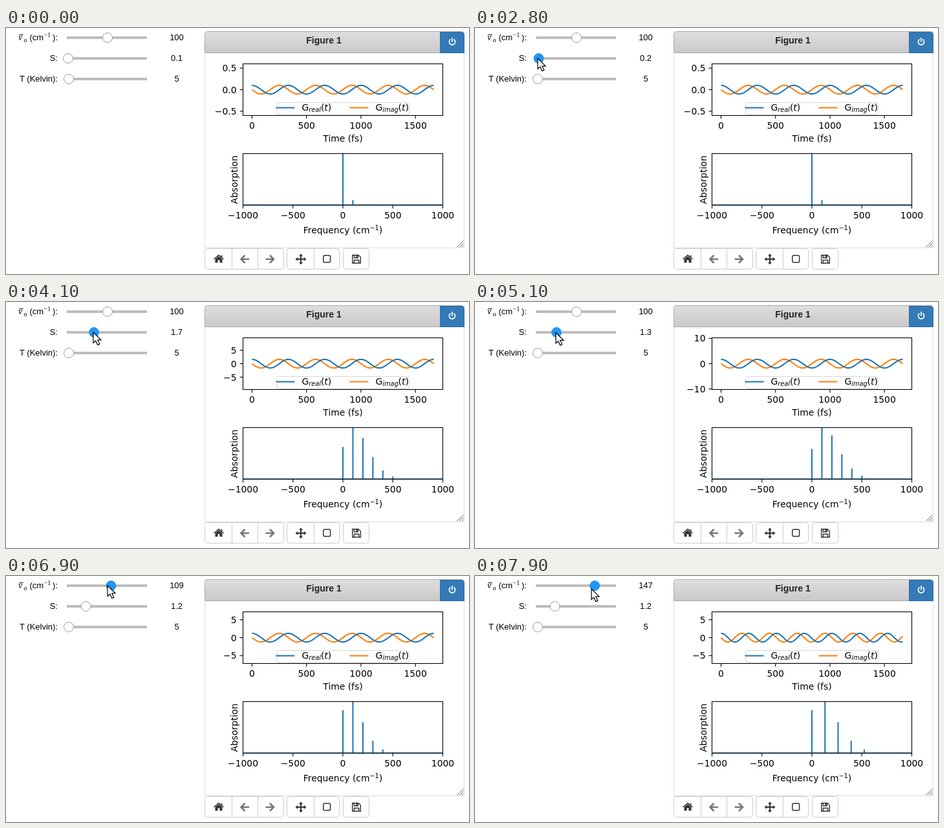
Write an HTML page that moves like this. It is 716 px wide and 381 px high and loops after 8000 ms.

```html
<!DOCTYPE html>
<html lang="en">
<head>
<meta charset="utf-8">
<title>Vibronic spectrum</title>
<style>
  html, body { margin: 0; width: 100%; height: 100%; overflow: hidden; background: #fff; }
  svg { display: block; }
  .ui { font-family: "Liberation Sans", Arial, sans-serif; font-size: 13px; }
  .math { font-family: "Liberation Serif", serif; }
  .plot { font-family: "DejaVu Sans", sans-serif; font-size: 13.89px; }
  .small { font-size: 9.72px; }
  .it { font-style: italic; }
  .mid { text-anchor: middle; }
  .end { text-anchor: end; }
  .line { fill: none; stroke-width: 2.08; stroke-linejoin: round; }
  .blue { stroke: #1f77b4; }
  .orange { stroke: #ff7f0e; }
  .axis { fill: none; stroke: #000; stroke-width: 1.1; }
  .button { fill: #fff; stroke: #ccc; }
</style>
</head>
<body>
<svg width="716" height="381" viewBox="0 0 716 381">
  <defs>
    <linearGradient id="bar" x1="0" y1="0" x2="0" y2="1">
      <stop offset="0" stop-color="#dedede"/><stop offset="1" stop-color="#c9c9c9"/>
    </linearGradient>
    <clipPath id="lower"><rect x="366.5" y="194.5" width="309" height="80"/></clipPath>
  </defs>

  <g class="ui">
    <text class="math it" x="19" y="19" font-size="14">ν</text>
    <path d="M20.5 10.5H26.5" stroke="#000"/>
    <text class="math it" x="27.5" y="21.5" font-size="10">o</text>
    <text x="36.5" y="19">(cm</text>
    <text class="math" x="58.5" y="13.5" font-size="10">−1</text>
    <text class="end" x="80" y="19">):</text>
    <text class="end" x="80" y="51">S:</text>
    <text class="end" x="80" y="83">T (Kelvin):</text>
    <g id="sliders"></g>
  </g>

  <path d="M307.5 39V340.5H708.5V39" fill="#fff" stroke="#ddd"/>
  <path d="M307.5 38.5V9.5q0-4 4-4H704.5q4 0 4 4V38.5Z" fill="url(#bar)" stroke="#aaa"/>
  <text class="ui mid" x="491.5" y="24" font-size="14" font-weight="bold" fill="#222" style="font-size:14px">Figure 1</text>
  <path d="M671.5 38.5V6.5H704.5q4 0 4 4V38.5Z" fill="#337ab7" stroke="#2e6da4"/>
  <path d="M687 18a4.6 4.6 0 1 0 6 0M690 15.5V21" fill="none" stroke="#fff" stroke-width="1.7" stroke-linecap="round"/>
  <path d="M697.5 339.5L707.5 329.5M701.5 339.5L707.5 333.5M705 339.5L707.5 337" stroke="#666"/>

  <g class="plot">
    <path id="imag" class="line orange"/>
    <path id="real" class="line blue"/>
    <rect x="418.5" y="115.5" width="205" height="18.5" rx="3" fill="#fff" fill-opacity=".8" stroke="#ccc" stroke-opacity=".8"/>
    <path class="line blue" d="M417.5 123.5h29"/>
    <path class="line orange" d="M531.5 123.5h29"/>
    <text x="457.5" y="128">G<tspan class="it small" dy="2.2">real</tspan><tspan dy="-2.2">(</tspan><tspan class="it">t</tspan>)</text>
    <text x="571.5" y="128">G<tspan class="it small" dy="2.2">imag</tspan><tspan dy="-2.2">(</tspan><tspan class="it">t</tspan>)</text>
    <g clip-path="url(#lower)"><path id="peaks" class="line blue"/></g>
    <rect class="axis" x="366.5" y="55.5" width="309" height="80"/>
    <rect class="axis" x="366.5" y="194.5" width="309" height="80"/>
    <g id="xTicks"></g>
    <g id="yTicks"></g>
    <text class="mid" x="521" y="176">Time (fs)</text>
    <text class="mid" x="521" y="318">Frequency (cm<tspan class="small" dy="-5">−1</tspan><tspan dy="5">)</tspan></text>
    <text class="mid" transform="translate(357.5 235) rotate(-90)">Absorption</text>
  </g>

  <g id="buttons">
    <rect class="button" x="307.5" y="341.5" width="122" height="32" rx="4"/>
    <path class="button" d="M349.5 341.5v32M389.5 341.5v32"/>
    <rect class="button" x="434.5" y="341.5" width="81" height="32" rx="4"/>
    <path class="button" d="M476.5 341.5v32"/>
    <rect class="button" x="521.5" y="341.5" width="40" height="32" rx="4"/>
  </g>
  <g fill="#333">
    <path d="M329 353.5L334.5 358V363.5H330.5V359.5H327.5V363.5H323.5V358Z"/>
    <path d="M321.5 358L329 351.8L336.5 358M333.6 352V355.5" fill="none" stroke="#333" stroke-width="1.6"/>
    <path id="arrow" d="M376 358H364M369.5 352L363.5 358L369.5 364" fill="none" stroke="#777" stroke-width="2.6"/>
    <use href="#arrow" transform="translate(777.5 0) scale(-1 1)"/>
    <path d="M449.5 358H462.5M456 351.5V364.5" stroke="#333" stroke-width="2"/>
    <path d="M456 349.5l3 3.7h-6ZM456 366.5l3-3.7h-6ZM447.5 358l3.7-3v6ZM464.5 358l-3.7-3v6Z"/>
    <rect x="490.8" y="352.3" width="10.8" height="10.8" rx="2" fill="none" stroke="#333" stroke-width="1.5"/>
    <path d="M535.7 351.7H545L548.3 355V364.3H535.7ZM538.3 351.7V356H544.2V351.7M538.3 364.3V359.5H545.7V364.3" fill="none" stroke="#333" stroke-width="1.4"/>
    <path d="M541.5 352h2v3.5h-2Z"/>
  </g>

  <path id="cursor" d="M0 0V16.5L3.8 13L6.8 19.6L9.8 18.3L6.9 11.9H12Z" fill="#fff" stroke="#000" stroke-width="1.2"/>
</svg>

<script>
const LOOP = 8000, STEP = 100;
const $ = id => document.getElementById(id);

// Tracks are [time, value...] keys with linear motion between them.
const strengthKeys = [[2700, .1], [2800, .2], [3400, 1.4], [3600, 1.5], [3700, 1.6], [4000, 1.6], [4100, 1.7],
  [4700, 1.7], [4800, 1.6], [4900, 1.4], [5000, 1.4], [5200, 1.2]];
const frequencyKeys = [[6600, 100], [6800, 105], [7300, 126], [7500, 135], [7900, 147]];
const cursorKeys = [[700, 169, 6], [800, 166, 9], [1000, 161, 12], [1700, 161, 12], [2000, 136, 24], [2400, 97, 48],
  [2700, 97, 47], [2800, 97, 47], [3400, 127, 48], [3700, 132, 47], [4100, 135, 47], [4300, 136, 48],
  [4700, 136, 48], [4900, 128, 48], [5300, 122, 47], [5500, 123, 48], [6000, 123, 48],
  [6100, 167, 9], [6400, 151, 14], [6600, 151, 14], [7300, 165, 16], [7500, 172, 18], [7900, 180, 20]];

function sample(keys, t) {
  const next = keys.findIndex(k => k[0] > t);
  if (next === 0) return keys[0].slice(1);
  if (next < 0) return keys[keys.length - 1].slice(1);
  const a = keys[next - 1], b = keys[next], u = (t - a[0]) / (b[0] - a[0]);
  return a.slice(1).map((v, i) => v + (b[i + 1] - v) * u);
}
const strengthAt = t => Math.round(sample(strengthKeys, t)[0] * 10) / 10;
const frequencyAt = t => Math.round(sample(frequencyKeys, t)[0]);

const sliders = [15, 47, 79].map(y => {
  const g = document.createElementNS("http://www.w3.org/2000/svg", "g");
  g.innerHTML = `<rect x="94" y="${y - 2}" width="124" height="4" fill="#bdbdbd"/>
    <circle cy="${y}" r="7.5" stroke="#9e9e9e"/><text class="mid" x="264" y="${y + 4}"></text>`;
  $("sliders").append(g);
  const [, thumb, label] = g.children;
  return { y, thumb, label };
});

function setSlider({ y, thumb, label }, x, text, focused, [cx, cy]) {
  const active = focused || Math.hypot(cx - x, cy - y) < 8;
  thumb.setAttribute("cx", x);
  thumb.setAttribute("fill", active ? "#2196f3" : "#fff");
  thumb.setAttribute("stroke", active ? "#2196f3" : "#9e9e9e");
  label.textContent = text;
}

const signed = (v, digits = 0) => (v < 0 ? "−" : "") + Math.abs(v).toFixed(digits);
const xTick = (x, y, v) => `<path class="axis" d="M${x} ${y}v5"/>
  <text class="mid" x="${x}" y="${y + 20.8}">${signed(v)}</text>`;

const FS = 280.9 / 1667.8, LEFT = 380.5;
$("xTicks").innerHTML = [0, 500, 1000, 1500].map(v => xTick(LEFT + v * FS, 135.5, v)).join("") +
  [-1000, -500, 0, 500, 1000].map(v => xTick(521 + v * .1545, 274.5, v)).join("");

function yTicks(strength) {
  const limit = 6 * strength;
  const step = [.5, 1, 2, 2.5, 5, 10].filter(s => s <= limit).pop();
  return [-step, 0, step].map(v => {
    const y = 95.5 - v / limit * 40;
    return `<path class="axis" d="M366.5 ${y}h-5"/>
      <text class="end" x="356.5" y="${y + 5.2}">${signed(v, step % 1 ? 1 : 0)}</text>`;
  }).join("");
}

function wave(frequency, fn) {
  const omega = 2 * Math.PI * 2.99792e-5 * frequency;
  let d = "";
  for (let x = 0; x <= 281; x++) {
    d += `${x ? "L" : "M"}${LEFT + x} ${(95.5 - 6.67 * fn(omega * x / FS)).toFixed(2)}`;
  }
  return d;
}

// Poisson progression scaled to its tallest line.
function peaks(strength, frequency) {
  const heights = [1];
  for (let n = 1; n < 8; n++) heights.push(heights[n - 1] * strength / n);
  const top = Math.max(...heights);
  return "M366 274.3H676" + heights.map((h, n) =>
    `M${521 + n * frequency * .1545} 274.5v${-80 * h / top}`).join("");
}

function draw(time) {
  const t = Math.floor(time % LOOP / STEP) * STEP;
  const strength = strengthAt(t), frequency = frequencyAt(t);
  const cursor = t < 700 ? [-50, -50] : sample(cursorKeys, t);
  $("cursor").setAttribute("transform", `translate(${cursor})`);

  setSlider(sliders[0], 97 + .6 * frequency, frequency, t >= 6700, cursor);
  setSlider(sliders[1], 93.5 + 25 * strength, strength.toFixed(1), t >= 2800 && t < 6700, cursor);
  setSlider(sliders[2], 97, 5, false, cursor);

  // The figure trails behind the sliders.
  const shownS = strengthAt(t - 400), shownF = frequencyAt(t - 500);
  $("real").setAttribute("d", wave(shownF, Math.cos));
  $("imag").setAttribute("d", wave(shownF, a => -Math.sin(a)));
  $("peaks").setAttribute("d", peaks(shownS, shownF));
  $("yTicks").innerHTML = yTicks(shownS);
}

const start = performance.now();
function tick() {
  draw(performance.now() - start);
  requestAnimationFrame(tick);
}
tick();
</script>
</body>
</html>
```
